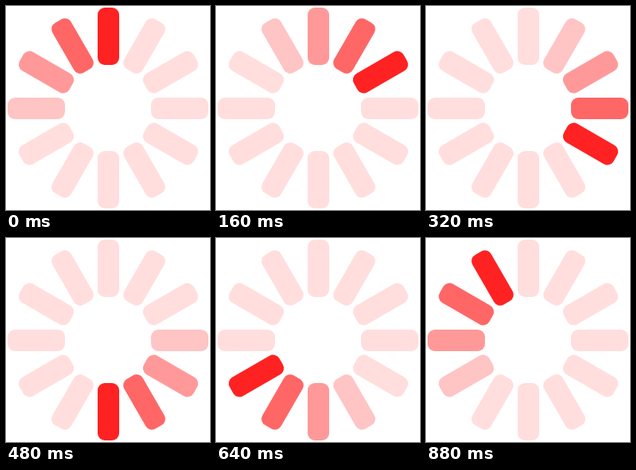
An HTML page that plays this animation: 256x256 px, repeating every 0.96 s.

```html
<!DOCTYPE html>
<html lang="en">
<head>
<meta charset="utf-8">
<title>Spinner</title>
<style>
html, body { margin: 0; width: 100%; height: 100%; overflow: hidden; background: #fff; }
svg { display: block; width: 100%; height: 100%; }
</style>
</head>
<body>
<svg viewBox="0 0 256 256"></svg>
<script>
const COUNT = 12, STEP = 80;
const TRAIL = ['#ff2222', '#ff6666', '#ff9999', '#ffc4c4'];
const REST = '#ffdedd';
const svg = document.querySelector('svg');

const bars = Array.from({ length: COUNT }, (_, i) => {
  const bar = document.createElementNS('http://www.w3.org/2000/svg', 'rect');
  // The half pixel keeps the upright and level bars crisp.
  const center = i % 6 === 3 ? '128 128.5' : '128.5 128';
  const attrs = {
    x: -13.5, y: -126, width: 27, height: 72, rx: 9,
    transform: `translate(${center}) rotate(${i * 360 / COUNT})`
  };
  for (const name in attrs) bar.setAttribute(name, attrs[name]);
  return svg.appendChild(bar);
});

function draw(now) {
  const head = Math.floor(now / STEP) % COUNT;
  bars.forEach((bar, i) => {
    const age = (head - i + COUNT) % COUNT;
    bar.setAttribute('fill', TRAIL[age] || REST);
  });
}

const start = performance.now();
function tick() {
  draw(performance.now() - start);
  requestAnimationFrame(tick);
}
tick();
</script>
</body>
</html>
```
